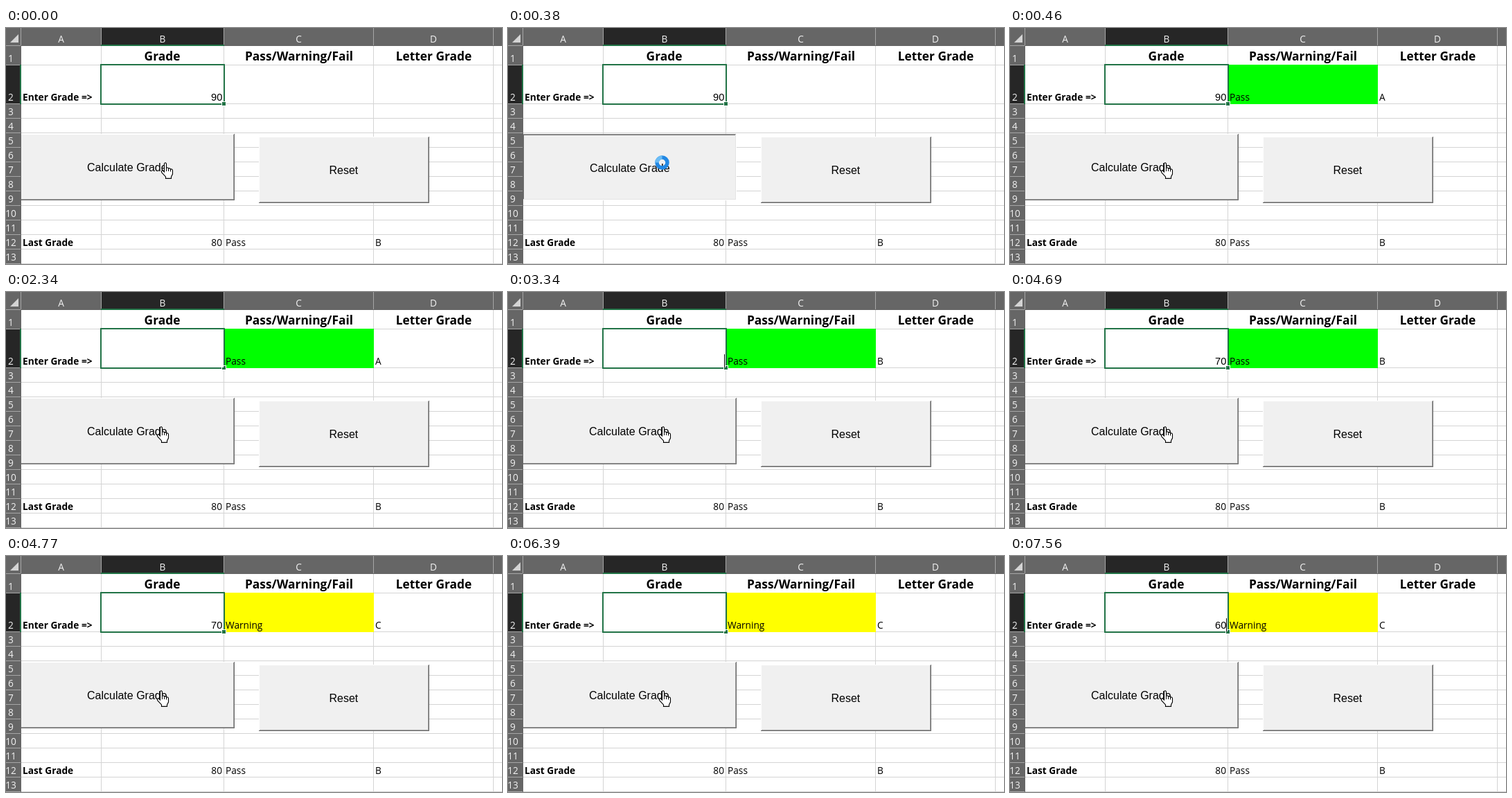
An HTML page that plays this animation: 716x341 px, repeating every 8 s.

```html
<!DOCTYPE html>
<html lang="en">
<head>
<meta charset="utf-8">
<title>Grade calculator sheet</title>
<style>
  html, body { margin: 0; width: 100%; height: 100%; overflow: hidden; background: #fff; }
  svg { display: block; }
  text { font: 13.7px "Open Sans", "Noto Sans", sans-serif; white-space: pre; }
  .bold { font-weight: 700; }
  .title { font-size: 17.35px; font-weight: 700; }
  .label { fill: #f0f0f0; }
  .button { font: 16px "Liberation Sans", Arial, sans-serif; }
  .entry { font: 14.67px "Liberation Sans", Arial, sans-serif; }
  .mid { text-anchor: middle; }
  .end { text-anchor: end; }
</style>
</head>
<body>
<svg id="stage" width="716" height="341" viewBox="0 0 716 341"></svg>
<script>
const LOOP = 8000;
const COLUMNS = [21, 137, 314, 530, 703];
const ROWS = [25, 53, 109];
while (ROWS.length < 14) ROWS.push(ROWS[ROWS.length - 1] + 21);

const rect = (x, y, w, h, fill, more = '') =>
  `<rect x="${x}" y="${y}" width="${w}" height="${h}" fill="${fill}" shape-rendering="crispEdges" ${more}/>`;
const text = (x, y, value, cls = '', more = '') =>
  `<text x="${x}" y="${y}" class="${cls}" ${more}>${value}</text>`;

function button(x, y, w, h, label, textX, pressed = false) {
  const [outerTop, innerTop, innerEnd, outerEnd] = pressed
    ? ['#a0a0a0', '#696969', '#e3e3e3', '#fff']
    : ['#fff', '#f0f0f0', '#a0a0a0', '#696969'];
  const shift = pressed ? 1 : 0;
  return rect(x, y, w, h, outerEnd)
    + rect(x, y, w - 1, h - 1, outerTop)
    + rect(x + 1, y + 1, w - 2, h - 2, innerEnd)
    + rect(x + 1, y + 1, w - 3, h - 3, innerTop)
    + rect(x + 2, y + 2, w - 4, h - 4, '#f0f0f0')
    + text(textX + shift, y + 54 + shift, label, 'button');
}

function gridLines() {
  return COLUMNS.slice(1).map(x => rect(x, 26, 1, 315, '#d4d4d4')).join('')
    + ROWS.slice(1).map(y => rect(22, y, 694, 1, '#d4d4d4')).join('');
}

function headers() {
  let out = rect(0, 0, 716, 26, '#666') + rect(0, 0, 22, 341, '#666')
    + rect(138, 0, 176, 25, '#262626') + rect(0, 54, 21, 55, '#262626');
  COLUMNS.forEach(x => out += rect(x, 0, 1, 25, '#a6a6a6'));
  ROWS.forEach(y => out += rect(0, y, 21, 1, '#a6a6a6'));
  out += rect(137, 24, 178, 2, '#217346') + rect(20, 53, 2, 57, '#217346')
    + '<path d="M18 9V21H6Z" fill="#d4d4d4"/>';
  [...'ABCD'].forEach((name, i) =>
    out += text((COLUMNS[i] + COLUMNS[i + 1]) / 2 + 0.5, 21, name, 'label mid'));
  ROWS.slice(1).forEach((y, i) => out += text(7, y - 4, i + 1, 'label mid'));
  return out;
}

const selection =
  '<path d="M137 53H315V110H137Z" fill="none" stroke="#217346" stroke-width="2" shape-rendering="crispEdges"/>'
  + rect(311, 106, 7, 7, '#fff') + rect(312, 107, 5, 5, '#217346');

const hand = `<path d="M5 2Q6.5-.4 8 2V8.2Q10 7 11 9 13 8 14 10 17 9.5 17 12V17L15 21V23.4H7V21L1.2 14.6
  Q.2 11.6 3 12L5 14Z" fill="#fff" stroke="#000" stroke-width="1.1"/>
  <path d="M8 8V13M11 9V13M14 10V13.5" stroke="#000" fill="none"/>`;

const spinner = `<g fill="none" stroke-width="5.5"><circle cx="222.5" cy="194.5" r="7.5" stroke="#2288e4"/>
  <path d="M215 194.5A7.5 7.5 0 0 1 222.5 187" stroke="#6bbcf5"/></g>`;

document.getElementById('stage').innerHTML =
  rect(0, 0, 716, 341, '#fff') + gridLines()
  + text(225.5, 47, 'Grade', 'title mid')
  + text(423, 47, 'Pass/Warning/Fail', 'title mid')
  + text(617.5, 47, 'Letter Grade', 'title mid')
  + text(24, 105, 'Enter Grade =&gt;', 'bold')
  + text(24, 315, 'Last Grade', 'bold')
  + text(312, 315, '80', 'end') + text(317, 315, 'Pass') + text(533, 315, 'B')
  + rect(314, 53, 217, 57, 'none', 'id="fill"')
  + text(317, 105, '', '', 'id="status"')
  + text(533, 105, '', '', 'id="letter"')
  + selection
  + rect(138, 54, 176, 55, '#fff', 'id="editor"')
  + text(312.3, 105, '', 'entry end', 'id="entry"')
  + rect(312, 90, 1, 19, '#000', 'id="caret"')
  + `<g id="up">${button(21, 153, 309, 96, 'Calculate Grade', 117)}</g>`
  + `<g id="down">${button(21, 153, 309, 96, 'Calculate Grade', 117, true)}</g>`
  + button(365, 157, 246, 96, 'Reset', 466.5)
  + headers()
  + `<g id="hand">${hand}</g><g id="busy">${spinner}</g>`;

// Each cue changes only the listed properties.
const CUES = [
  [0, { entry: '90', status: '', letter: '', fill: 'none', caret: 0, editing: false, busy: false, handX: 223.5 }],
  [230, { handX: 217.5 }],
  [380, { busy: true }],
  [460, { busy: false, status: 'Pass', letter: 'A', fill: '#0f0' }],
  [2340, { editing: true, entry: '' }],
  [2410, { caret: 1 }],
  [2810, { caret: 0.65 }], [2885, { caret: 0.3 }], [2960, { caret: 0 }],
  [3340, { caret: 1, letter: 'B' }],
  [3660, { caret: 0.6 }], [3740, { caret: 0 }],
  [3820, { caret: 1, entry: '7' }],
  [3990, { entry: '70' }],
  [4310, { caret: 0.65 }], [4385, { caret: 0.3 }], [4460, { caret: 0 }],
  [4690, { editing: false }],
  [4770, { status: 'Warning', letter: 'C', fill: '#ff0' }],
  [6390, { editing: true, entry: '' }],
  [6470, { caret: 1 }],
  [6850, { entry: '6' }],
  [7330, { caret: 0.6 }], [7410, { caret: 0.2 }],
  [7560, { caret: 1, entry: '60' }],
];

const part = id => document.getElementById(id);
const show = (id, on) => part(id).style.display = on ? '' : 'none';

function draw(now) {
  const time = now % LOOP;
  const state = {};
  for (const [start, change] of CUES) if (start <= time) Object.assign(state, change);
  for (const id of ['entry', 'status', 'letter']) part(id).textContent = state[id];
  part('fill').setAttribute('fill', state.fill);
  part('caret').setAttribute('opacity', state.caret);
  part('hand').setAttribute('transform', `translate(${state.handX} 194)`);
  show('editor', state.editing);
  show('up', !state.busy);
  show('down', state.busy);
  show('hand', !state.busy);
  show('busy', state.busy);
  requestAnimationFrame(draw);
}
draw(performance.now());
</script>
</body>
</html>
```
